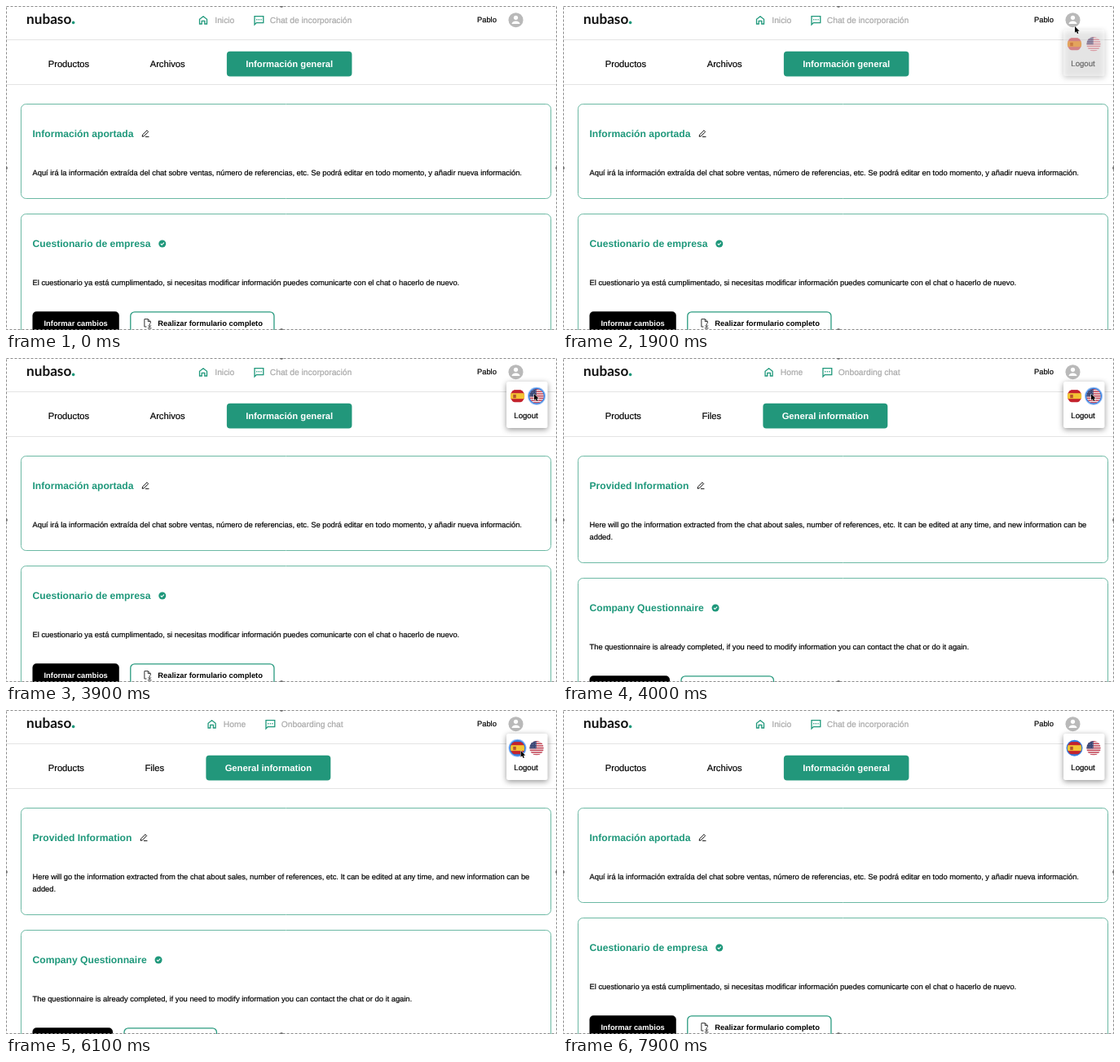
Animation, 676 px wide and 398 px high, one loop 8000 ms. Source, as an HTML page with a canvas:

```html
<!DOCTYPE html>
<html lang="es">
<head>
<meta charset="utf-8">
<title>Información general</title>
<style>
html, body { margin: 0; width: 100%; height: 100%; overflow: hidden; background: #fff; }
canvas { display: block; width: 676px; height: 398px; }
</style>
</head>
<body>
<canvas id="stage"></canvas>
<script>
const W = 676, H = 398, LOOP = 8000, STEP = 100;
const GREEN = '#1f987b', BORDER = '#6cb9a4', GREY = '#a8a8a8', BLUE = '#2f7de1';
const SANS = '"Liberation Sans", Arial, sans-serif';
const BODY = 28 / 3, NAV = 10.27, TAB = 11.2, TITLE = 12.13;
const LEFT = 32.5, LEADING = 15, FLAG_Y = 46.7, ES_X = 627.5, US_X = 651;

const canvas = document.getElementById('stage');
const dpr = window.devicePixelRatio || 1;
canvas.width = W * dpr;
canvas.height = H * dpr;
const c = canvas.getContext('2d');
c.scale(dpr, dpr);
c.textRendering = 'geometricPrecision';

const ES = {
  home: 'Inicio', chat: 'Chat de incorporación',
  tabs: ['Productos', 'Archivos', 'Información general'],
  info: 'Información aportada',
  infoText: ['Aquí irá la información extraída del chat sobre ventas, número de referencias, etc. Se podrá editar en todo momento, y añadir nueva información.'],
  form: 'Cuestionario de empresa',
  formText: 'El cuestionario ya está cumplimentado, si necesitas modificar información puedes comunicarte con el chat o hacerlo de nuevo.',
  change: 'Informar cambios', fill: 'Realizar formulario completo'
};
const EN = {
  home: 'Home', chat: 'Onboarding chat',
  tabs: ['Products', 'Files', 'General information'],
  info: 'Provided Information',
  infoText: ['Here will go the information extracted from the chat about sales, number of references, etc. It can be edited at any time, and new information can be', 'added.'],
  form: 'Company Questionnaire',
  formText: 'The questionnaire is already completed, if you need to modify information you can contact the chat or do it again.',
  change: 'Report changes', fill: 'Complete form'
};

const icons = {
  home: new Path2D('M3.4 10H.7V4.2L5.2.8l4.5 3.4V10H7V6.4H3.4Z'),
  chat: new Path2D('M.7 11V.7H11.5V8.6H3Z'),
  pen: new Path2D('M1 8.4l.4-2.3L6.8.8l1.7 1.7-5.3 5.4ZM4.8 8.7h4.5'),
  file: new Path2D('M3.2 10H.6V.6H5l3 3v2.2M5 .6v3h3M6.9 6v4.2M5.1 8.6l1.8 1.8 1.8-1.8M4.6 11.8h4.6'),
  check: new Path2D('M-2 0l1.4 1.5L2.1-1.4'),
  arrow: new Path2D('M0 0V7.8L1.8 6.2 3 9 4.4 8.4 3.2 5.7H5.6Z')
};

// Each leg glides from the previous stop to x, y
const LEGS = [
  { from: 700, to: 1500, x: 628, y: 25 },
  { from: 2300, to: 2700, x: 633.5, y: 38 },
  { from: 2700, to: 3200, x: 648.5, y: 38 },
  { from: 3700, to: 3800, x: 648, y: 44 },
  { from: 5000, to: 5800, x: 631.5, y: 50 },
  { from: 6800, to: 7400, x: 679, y: 54 }
];

const easeOut = u => 1 - (1 - u) ** 1.8;
const clamp = u => Math.max(0, Math.min(1, u));

function width(s, size, weight = 400) {
  c.font = `${weight} ${size}px ${SANS}`;
  return c.measureText(s).width;
}

// Draws a line of text and returns its right edge
function text(s, x, y, size, color = '#000', weight = 400) {
  const w = width(s, size, weight);
  c.fillStyle = c.strokeStyle = color;
  c.fillText(s, x, y);
  if (weight === 400) {
    c.lineWidth = .2;
    c.strokeText(s, x, y);
  }
  return x + w;
}

function box(x, y, w, h, r, fill, stroke, lw = 1) {
  c.beginPath();
  c.roundRect(x, y, w, h, r);
  c.fillStyle = fill;
  c.fill();
  if (!stroke) return;
  c.strokeStyle = stroke;
  c.lineWidth = lw;
  c.stroke();
}

function bar(x, y, w, h, color) {
  c.fillStyle = color;
  c.fillRect(x, y, w, h);
}

function disc(x, y, r, fill) {
  c.beginPath();
  c.arc(x, y, r, 0, 7);
  c.fillStyle = fill;
  c.fill();
}

function at(x, y, draw) {
  c.save();
  c.translate(x, y);
  draw();
  c.restore();
}

function icon(name, x, y, color, lw) {
  at(x, y, () => {
    c.strokeStyle = color;
    c.lineWidth = lw;
    c.stroke(icons[name]);
  });
}

function navItem(name, label, x) {
  icon(name, x, 12, GREEN, 1.3);
  if (name === 'chat') for (let i = 0; i < 3; i++) disc(x + 3.5 + i * 2.6, 16.7, .8, GREEN);
  return text(label, x + 19.5, 20.8, NAV, GREY);
}

function header(p) {
  c.font = '700 17.2px Lato, sans-serif';
  c.fillStyle = '#111';
  c.fillText('nubaso', 25, 22);
  disc(82.6, 20.4, 1.8, GREEN);

  const navWidth = 63 + width(p.home, NAV) + width(p.chat, NAV);
  const homeEnd = navItem('home', p.home, 330.5 - navWidth / 2);
  navItem('chat', p.chat, homeEnd + 24);

  text('Pablo', 578, 20.4, BODY);
  disc(625.5, 17.2, 9, '#b9b9b9');
  disc(625.5, 14.3, 2.6, '#fff');
  c.beginPath();
  c.ellipse(625.5, 22, 5, 3.6, 0, Math.PI, 0);
  c.fill();

  bar(0, 41, W, 1, '#e4e4e4');
  bar(0, 96, W, 1, '#e4e4e4');
  let x = 51.7;
  p.tabs.forEach((label, i) => {
    const active = i === 2, weight = active ? 700 : 400;
    if (active) box(x - 23.3, 55.7, width(label, TAB, weight) + 46.6, 30.7, 4, '#22977b');
    x = text(label, x, 75.3, TAB, active ? '#fff' : '#000', weight) + 74.6;
  });
}

function cards(p) {
  const dy = (p.infoText.length - 1) * LEADING;
  box(18.5, 120.5, 650, 116 + dy, 6, '#fff', BORDER);
  const infoEnd = text(p.info, LEFT, 161.2, TITLE, GREEN, 700);
  icon('pen', infoEnd + 9.7, 152, '#111', 1);
  p.infoText.forEach((s, i) => text(s, LEFT, 208.2 + i * LEADING, BODY));

  at(0, dy, () => {
    box(18.5, 255.5, 650, 200, 6, '#fff', BORDER);
    const tick = text(p.form, LEFT, 296, TITLE, GREEN, 700) + 14.4;
    disc(tick, 292, 4.5, GREEN);
    icon('check', tick, 292, '#fff', 1.1);
    text(p.formText, LEFT, 342.8, BODY);

    const pad = 14, changeWidth = width(p.change, BODY, 700) + 2 * pad;
    box(LEFT, 375.3, changeWidth, 29, 5, '#000');
    text(p.change, LEFT + pad, 393, BODY, '#fff', 700);
    const x = LEFT + changeWidth + pad;
    box(x, 375.8, width(p.fill, BODY, 700) + 33.6 + pad, 29, 5, '#fff', '#2b9b80', 1.3);
    icon('file', x + 16.5, 384, '#333', 1);
    text(p.fill, x + 33.6, 393, BODY, '#000', 700);
  });
}

function flag(x, r, draw) {
  c.save();
  c.beginPath();
  c.arc(x, FLAG_Y, r, 0, 7);
  c.clip();
  c.translate(x - r, FLAG_Y - r);
  draw(2 * r);
  c.restore();
}

function spain(d) {
  const top = d * .07, h = d - 2 * top;
  bar(0, top, d, h, '#c3222d');
  bar(0, top + h * .27, d, h * .46, '#f3c534');
  bar(d * .2, d * .4, d * .2, d * .24, '#b4532d');
}

function usa(d) {
  const h = d / 13;
  bar(0, 0, d, d, '#f3eeee');
  for (let i = 0; i < 13; i += 2) bar(0, i * h, d, h, '#c0364a');
  bar(0, 0, d * .48, h * 7, '#3b4876');
  for (let i = 0; i < 9; i++) disc(1.8 + (i % 3) * 2.7, 2.2 + Math.floor(i / 3) * 2.6, .4, '#ccd');
}

function ring(x, thick) {
  if (thick) disc(x, FLAG_Y, 11, 'rgba(70,140,235,.55)');
  disc(x, FLAG_Y, 10, BLUE);
}

function menu(t) {
  if (t < 1900) return;
  c.save();
  c.globalAlpha = clamp((t - 1700) / 400);
  c.save();
  c.shadowColor = 'rgba(0,0,0,.42)';
  c.shadowBlur = 7 * dpr;
  c.shadowOffsetY = 2 * dpr;
  box(614, 29, 50.5, 57, 2.5, '#fff');
  c.restore();
  if (t >= 6000) ring(ES_X, t < 7000);
  else if (t >= 3800) ring(US_X, t < 5300);
  flag(ES_X, 8.8, spain);
  flag(US_X, 8.8, usa);
  text('Logout', 623.3, 74.2, 9.6);
  c.restore();
}

function pointer(t) {
  if (t < LEGS[0].from) return;
  let x = 556, y = 92;
  for (const leg of LEGS) {
    const u = easeOut(clamp((t - leg.from) / (leg.to - leg.from)));
    x += (leg.x - x) * u;
    y += (leg.y - y) * u;
  }
  icon('arrow', x, y, '#fff', 1);
  at(x, y, () => {
    c.fillStyle = '#000';
    c.fill(icons.arrow);
  });
}

function frame() {
  c.save();
  c.setLineDash([3, 2]);
  c.strokeStyle = '#8c8c8c';
  c.lineWidth = 1;
  c.strokeRect(.5, .5, W - 1, H - 1);
  c.restore();
  for (const end of [0, 1]) {
    disc(W / 2, end * H, 2, '#777');
    disc(end * W, H / 2, 2, '#777');
  }
}

function draw(t) {
  const page = t >= 4000 && t < 6200 ? EN : ES;
  bar(0, 0, W, H, '#fff');
  header(page);
  cards(page);
  menu(t);
  pointer(t);
  frame();
}

const start = performance.now();
function tick() {
  const t = (performance.now() - start) % LOOP;
  draw(Math.floor(t / STEP) * STEP);
  requestAnimationFrame(tick);
}
tick();
</script>
</body>
</html>
```
